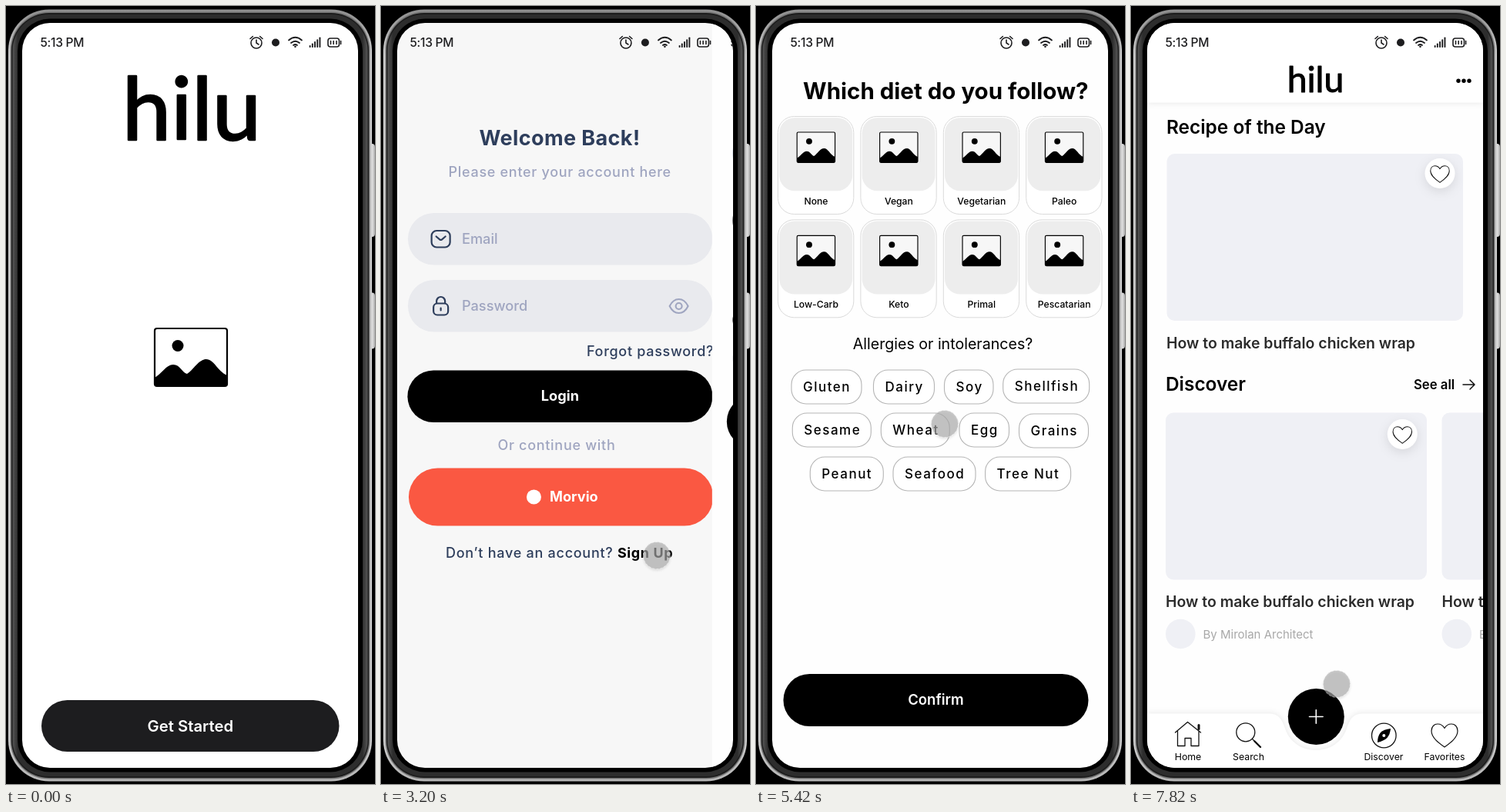
These frames come from a looping animation (479x1011 px, 8000 ms). An HTML page:

```html
<!DOCTYPE html>
<html lang="en">
<head>
<meta charset="utf-8">
<title>Recipe app walkthrough</title>
<style>
html, body { margin: 0; width: 100%; height: 100%; overflow: hidden; background: #000; }
svg { display: block; width: 100vw; height: 100vh; }
text { font-family: Inter, Roboto, sans-serif; white-space: pre; }
.line { fill: none; stroke-linecap: round; stroke-linejoin: round; }
.lift { filter: drop-shadow(0 4px 7px rgba(0, 0, 0, .1)); }
.bar { filter: drop-shadow(0 0 4px rgba(0, 0, 0, .1)); }
#cursor { filter: drop-shadow(0 2px 1.5px rgba(0, 0, 0, .15)); }
</style>
</head>
<body>
<svg id="stage" viewBox="0 0 479 1011"></svg>
<script>
const LOOP = 8000, SCREEN_W = 436;
const NAVY = '#2e3e5c', MUTED = '#9fa5c0', INK = '#1d1d1f', PALE = '#eff0f5';

const text = (x, y, str, size, weight = 500, fill = '#000', anchor = 'start', gap = 0) =>
  `<text x="${x}" y="${y}" font-size="${size}" font-weight="${weight}" fill="${fill}" text-anchor="${anchor}" letter-spacing="${gap}">${str}</text>`;
const mid = (x, y, str, size, weight, fill, gap) => text(x, y, str, size, weight, fill, 'middle', gap);
const box = (x, y, w, h, r, fill, more = '') =>
  `<rect x="${x}" y="${y}" width="${w}" height="${h}" rx="${r}" fill="${fill}" ${more}/>`;
const dot = (x, y, r, fill, more = '') => `<circle cx="${x}" cy="${y}" r="${r}" fill="${fill}" ${more}/>`;
const line = (d, color, width) => `<path class="line" d="${d}" stroke="${color}" stroke-width="${width}"/>`;
const at = (x, y, body, scale = 1) => `<g transform="translate(${x} ${y}) scale(${scale})">${body}</g>`;
const page = (id, bg, body) =>
  `<g id="${id}">${box(21, 22, SCREEN_W, 968, 0, bg)}${body}${statusBar}</g>`;

const statusBar = text(44.5, 53, '5:13 PM', 15.6, 500, INK, 'start', -.3)
  + dot(325, 48, 7, 'none', `stroke="${INK}" stroke-width="1.6"`)
  + line('M325 44v4l3 2M317 42.5l3.4-3M333 42.5l-3.4-3', INK, 1.6)
  + dot(350, 47.5, 5, INK)
  + line('M367 44.5q8.5-7.5 17 0M370 48q5.5-4.6 11 0M373 51q2.5-2 5 0', INK, 1.8)
  + dot(375.5, 52.8, 1.3, INK)
  + [3, 5.5, 8, 10.7, 13.5].map((h, i) => box(393.7 + i * 3.2, 54 - h, 1.9, h, .8, INK)).join('')
  + box(418, 42, 14.5, 11, 3, 'none', `stroke="${INK}" stroke-width="1.6"`)
  + line('M421.5 45.5v4M425.2 45.5v4M429 45.5v4M434.6 45.5v4', INK, 1.6);

const wordmark = `<text text-anchor="middle" font-size="113" fill="#000" stroke="#000" stroke-width="2.4" stroke-linejoin="round" style="font-family:Lato,sans-serif">hilu</text>`;

const picture = width => box(1, 1, 94, 75, 3, 'none', `stroke="#000" stroke-width="${width}"`)
  + dot(31, 23.5, 7.5, '#000')
  + '<path d="M1 65C10 60 16 48 25 48S36 58 43 60C52 54 58 41 68 41S82 56 95 62V74Q95 76 93 76H3Q1 76 1 74Z"/>';

const mail = (x, y, c) => at(x, y, box(-12, -10.5, 24, 21.5, 6.5, 'none', `stroke="${c}" stroke-width="2.2"`)
  + line('M-6-3l4.5 3.8q1.5 1.2 3 0L6-3', c, 2.2));
const lock = (x, y, c) => at(x, y, box(-9.5, -3.5, 19, 15, 5, 'none', `stroke="${c}" stroke-width="2.2"`)
  + line('M-5.5-4v-2.5a5.5 5.5 0 0 1 11 0V-4M0 2.5v3', c, 2.2));
const eye = (x, y) => at(x, y, line('M-12 0C-6-12 6-12 12 0C6 12-6 12-12 0Z', MUTED, 2.1)
  + dot(0, 0, 4, 'none', `stroke="${MUTED}" stroke-width="2.1"`));
const heart = (x, y, scale, width) => at(x, y,
  line('M0 15C-7 10-17 3-17-6C-17-12-13-15-9-15C-5-15-2-13 0-9.5C2-13 5-15 9-15C13-15 17-12 17-6C17 3 7 10 0 15Z', '#111', width), scale);
const check = (y, fill, mark) => dot(62, y, 14.5, fill) + line(`M57 ${y}l3.6 3.6 6.6-7`, mark, 2);
const like = (x, y) => dot(x, y, 19.5, '#fff', 'class="lift"') + heart(x, y + 1, .72, 1.4);

const splash = page('splash', '#fff',
  at(241, 174, wordmark) + at(192, 418, picture(2.2))
  + box(46, 902, 386.5, 67, 33.5, INK) + mid(239.3, 943, 'Get Started', 20.3, 600, '#fff'));

const login = page('login', '#f7f7f7',
  mid(239, 181, 'Welcome Back!', 27, 700, NAVY, .4)
  + mid(239.3, 221.5, 'Please enter your account here', 18, 500, MUTED, .7)
  + box(42, 269, 395.5, 67.5, 33.7, '#e9eaee') + box(42, 356, 395.5, 67.5, 33.7, '#e9eaee')
  + mail(84.7, 302.5, NAVY) + lock(84.7, 390, NAVY) + eye(393.7, 390)
  + text(112, 308.5, 'Email', 18.2, 500, MUTED) + text(112, 396, 'Password', 18.2, 500, MUTED)
  + text(274, 455, 'Forgot password?', 18, 500, NAVY, 'start', .7)
  + box(41.5, 473.5, 396, 67.5, 33.7, '#000') + mid(239.5, 513, 'Login', 18.2, 700, '#fff')
  + mid(235, 577, 'Or continue with', 18, 500, MUTED, .7)
  + box(43, 600.5, 395.5, 75, 37.5, '#fa5842') + dot(205.5, 638, 9.5, '#fff')
  + text(226, 644, 'Morvio', 18.2, 700, '#fff')
  + text(91, 716.5, 'Don’t have an account?', 18, 500, NAVY, 'start', .73)
  + text(314, 716.5, 'Sign Up', 18, 700, '#000', 'start', .6));

const signup = page('signup', '#fefefe',
  mid(248, 117.5, 'Welcome!', 27, 700, '#000', .2)
  + box(48, 158, 395, 67, 33.5, 'none', 'stroke="#d3dae8" stroke-width="1.1"')
  + box(48.7, 245.7, 393.6, 66, 33, 'none', `stroke="${INK}" stroke-width="2.2"`)
  + mail(91, 191.3, '#3d5480') + lock(91, 279, '#3d5480') + eye(400, 279)
  + text(118, 197.5, 'Email or phone number', 18.2, 500, MUTED)
  + Array.from({ length: 8 }, (_, i) => dot(123 + i * 10.25, 280.3, 3.3, '#3f5083')).join('')
  + box(199.3, 265, 1.6, 27, 0, '#111')
  + text(48, 366, 'Your Password must contain:', 20, 500, '#000', 'start', .8)
  + check(408, '#383838', '#d5d5d8') + check(458, '#e9eaee', MUTED)
  + text(86.5, 415, 'At least 6 characters', 18, 500, NAVY, 'start', .7)
  + text(86.5, 465, 'Contains a number', 18, 500, MUTED, 'start', .72)
  + box(40, 506, 396, 68, 34, '#000') + mid(238.3, 546, 'Sign Up', 18.2, 700, '#fff'));

const diets = ['None', 'Vegan', 'Vegetarian', 'Paleo', 'Low-Carb', 'Keto', 'Primal', 'Pescatarian'];
const chips = [
  ['Gluten', 46, 473, 91], ['Dairy', 152.5, 473, 79], ['Soy', 244.5, 473, 63.5], ['Shellfish', 320.7, 472, 112],
  ['Sesame', 47.3, 529, 102], ['Wheat', 162.3, 529, 89], ['Egg', 264, 529, 64.5], ['Grains', 341.5, 530, 90],
  ['Peanut', 70.3, 586, 95], ['Seafood', 178, 586, 107], ['Tree Nut', 297.6, 586, 111]
];
const dietCard = (name, i) => at(28.5 + i % 4 * 107.4, 143.5 + (i > 3) * 134.3,
  box(0, 0, 98.3, 127, 21, '#fff', 'stroke="#dadada" stroke-width="1"')
  + box(1.7, 1.7, 95, 95, 20, '#ededed')
  + at(24.2, 20, box(1, 1, 94, 75, 3, '#f7f7f7') + picture(2.2), .525)
  + mid(49.5, 114, name, 12.2, 500));
const chip = ([name, x, y, w]) => box(x, y, w, 44, 19, '#fff', 'stroke="#b5b5b5" stroke-width="1.1"')
  + text(x + 15, y + 28.3, name, 17, 500, '#000', 'start', 1.5);

const diet = page('diet', '#fefefe',
  mid(246.3, 121.3, 'Which diet do you follow?', 29.5, 700)
  + diets.map(dietCard).join('')
  + mid(242.5, 446, 'Allergies or intolerances?', 19.6, 400)
  + chips.map(chip).join('')
  + box(35.5, 868, 396, 68, 34, '#000') + mid(233.5, 908, 'Confirm', 18.5, 600, '#fff'));

const recipe = 'How to make buffalo chicken wrap';
const discoverCard = x => box(x, 528.5, 339, 217, 10, PALE)
  + text(x, 781, recipe, 19.45, 600, '#2b2b2b')
  + dot(x + 19.3, 816, 19.3, PALE) + text(x + 48.5, 821.5, 'By Mirolan Architect', 15, 400, '#a8a8a8');
const navLabels = [['Home', 74], ['Search', 152.5], ['Discover', 328], ['Favorites', 407]];

const home = page('home', '#fefefe',
  box(21, 22, SCREEN_W, 103.5, 0, '#fff', 'class="bar"')
  + at(239.5, 111.5, wordmark, .41)
  + [425, 432, 439].map(x => dot(x, 97.3, 2.7, '#000')).join('')
  + text(46, 166, 'Recipe of the Day', 24.4, 600)
  + box(46.5, 192, 384.5, 217, 10, PALE) + like(401, 217.5)
  + text(46, 444.5, recipe, 19.45, 600, '#2b2b2b')
  + text(45, 500, 'Discover', 24.4, 600) + text(367, 498, 'See all', 16.7, 600)
  + line('M431 492h15M440 486l6 6-6 6', '#111', 1.5)
  + discoverCard(45) + discoverCard(403.5) + like(352.3, 556.5)
  + '<path class="bar" fill="#fff" d="M21 919.5H178C192 919.5 196 927 200 939C206 957 222 967 240 967S274 957 280 939C284 927 288 919.5 302 919.5H457V990H21Z"/>'
  + dot(240.3, 923.5, 36.5, '#000') + line('M231.5 923.5h17.6M240.3 914.7v17.6', '#fff', 1.6)
  + line('M57.5 944L73.5 930.5 90.5 944M60.5 942v19.5h9.5v-10h8v10h10V942', '#111', 1.3)
  + line('M88 934.5v5', '#111', 3)
  + dot(148.8, 943.8, 12, 'none', 'stroke="#111" stroke-width="1.3"')
  + line('M157.5 952.5l3 3', '#111', 1.3) + line('M160.5 955.5l7.5 7.5', '#111', 2.4)
  + dot(328.3, 948, 15.8, 'none', 'stroke="#111" stroke-width="1.3"')
  + '<path d="M337 939Q328 940 324 944Q320 949 320 957Q328 955 332.5 951Q336.5 946 337 939Z"/>'
  + dot(328.3, 948, 2, '#fff')
  + heart(407, 948, 1, 1.2)
  + navLabels.map(([name, x]) => mid(x, 980, name, 12.3, 400)).join(''));

const phone = box(471, 179, 8, 121, 4, 'url(#key)') + box(471, 372.5, 8, 73, 4, 'url(#key)')
  + box(3, 4.5, 472, 1003, 53, 'url(#rim)')
  + box(5.5, 7.5, 467, 997, 50.5, '#747474') + box(7, 9, 464, 994, 49, '#1c1c1c')
  + box(8.5, 11, 461, 990, 47, 'url(#side)')
  + box(15, 16.5, 448, 979, 42, '#000');

const cursor = '<g id="cursor">'
  + '<circle id="ring" r="17.5" stroke="#fff" stroke-opacity=".55" stroke-width=".8" stroke-dasharray="3 2"/>'
  + '<circle id="core" r="12" fill="#c6c63c"/></g>';

document.getElementById('stage').innerHTML = `<defs>
  <clipPath id="screen">${box(21, 22, SCREEN_W, 968, 36, '#fff')}</clipPath>
  <linearGradient id="rim" x2="0" y2="1"><stop stop-color="#8d8d8d"/><stop offset=".06" stop-color="#cfcfcf"/><stop offset=".94" stop-color="#cfcfcf"/><stop offset="1" stop-color="#b5b5b5"/></linearGradient>
  <linearGradient id="side"><stop stop-color="#555"/><stop offset=".015" stop-color="#2d2d2d"/><stop offset=".985" stop-color="#2d2d2d"/><stop offset="1" stop-color="#555"/></linearGradient>
  <linearGradient id="key"><stop stop-color="#777"/><stop offset=".6" stop-color="#e2e2e2"/><stop offset="1" stop-color="#a5a5a5"/></linearGradient>
</defs>${box(0, 0, 479, 1011, 0, '#000')}${phone}
<g clip-path="url(#screen)">${splash}${login}${signup}${diet}${home}</g>${cursor}`;

const el = id => document.getElementById(id);
const pages = [['splash', 0, 1400], ['login', 1400, 3600], ['signup', 3191, 5220], ['diet', 5220, 7420], ['home', 7420, LOOP]];
// time, x, y
const path = [
  [200, 389, 1004], [600, 338, 964], [1000, 265, 920], [1200, 265, 925], [1400, 265, 925],
  [2000, 308, 830], [2600, 352, 726], [2800, 358, 714], [3600, 358, 714],
  [4200, 315, 592], [4620, 244, 540], [5220, 244, 540], [5420, 245, 543],
  [6020, 84, 250], [6220, 79, 242], [6420, 115, 430], [6620, 178, 667],
  [7020, 264, 890], [7220, 266, 896], [7420, 266, 896], [7820, 267, 881]
];
// start, end, strength
const presses = [[1200, 1400, 1], [3000, 3200, .7], [5020, 5220, .45], [7220, 7420, .45]];

const tick = t => t < 4620 ? Math.min(Math.floor(t / 200) * 200, 4400)
  : 4620 + Math.floor((t - 4620) / 200) * 200;

function cursorAt(t) {
  const i = path.findIndex(p => p[0] > t);
  if (i < 0) return path[path.length - 1].slice(1);
  const a = path[Math.max(i - 1, 0)], b = path[i];
  const k = b === a ? 0 : (t - a[0]) / (b[0] - a[0]);
  return [a[1] + (b[1] - a[1]) * k, a[2] + (b[2] - a[2]) * k];
}

function draw(t) {
  for (const [id, from, to] of pages) el(id).style.display = t >= from && t < to ? '' : 'none';

  const u = Math.min(Math.max((t - 3190.5) / 300, 0), 1);
  const moved = SCREEN_W * (1 - (1 - u) ** 2);
  el('login').setAttribute('transform', `translate(${-.26 * moved} 0)`);
  el('signup').setAttribute('transform', `translate(${SCREEN_W - moved} 0)`);

  const [x, y] = cursorAt(t);
  const press = presses.find(p => t >= p[0] && t < p[1]);
  el('cursor').style.display = t < 200 ? 'none' : '';
  el('cursor').setAttribute('transform', `translate(${x} ${y})`);
  el('ring').setAttribute('fill', press ? `rgba(145,145,145,${press[2]})` : 'rgba(172,172,172,.65)');
  el('core').setAttribute('opacity', press ? .45 + press[2] * .55 : 0);
}

const start = performance.now();
function frame() {
  draw(tick((performance.now() - start) % LOOP));
  requestAnimationFrame(frame);
}
frame();
</script>
</body>
</html>
```
